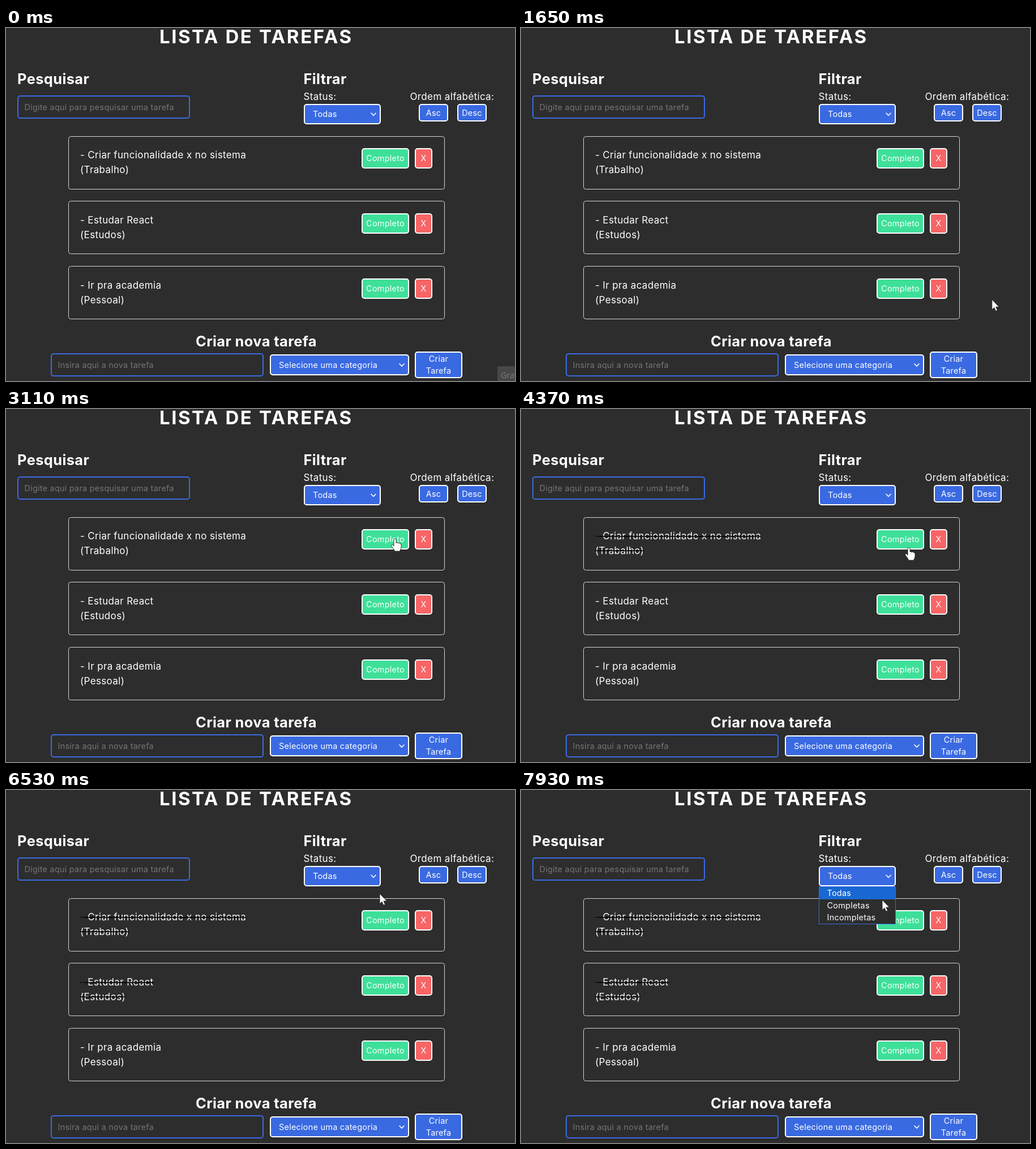
Write an HTML page that moves like this. It is 899 px wide and 623 px high and loops after 8000 ms.

```html
<!DOCTYPE html>
<html lang="pt">
<head>
<meta charset="utf-8">
<title>Lista de tarefas</title>
<style>
  html, body { margin: 0; width: 100%; height: 100%; overflow: hidden; background: #2d2d2d; }
  svg { display: block; width: 899px; height: 623px; }
  text { font: 400 14.4px Inter, "Open Sans", sans-serif; letter-spacing: .27px; fill: #fff; }
  .title { font-size: 33px; font-weight: 700; letter-spacing: 2.6px; }
  .head { font-size: 25.4px; font-weight: 700; letter-spacing: .4px; }
  .body { font-size: 17px; letter-spacing: .36px; }
  .hint { fill: #757575; }
  .mid { text-anchor: middle; }
  .tip { font: 14px "Open Sans", sans-serif; letter-spacing: 0; fill: #7d7d7d; }
</style>
</head>
<body>
<svg viewBox="0 0 899 623" xmlns="http://www.w3.org/2000/svg">
  <g id="page"></g>
  <g id="menu"></g>
  <g id="tip"></g>
  <g id="cursor" fill="#fff" stroke="#151515" stroke-width=".8" stroke-linejoin="round">
    <path id="arrow" d="M0 0V18L4 14.2L6.8 20.3L9.6 19L6.9 13H12.6Z"/>
    <path id="hand" d="M-2 1Q0 -2 2 1V7Q4 6 5 8Q7 6 8 8Q11 8 11 11V15Q11 18 9 20V22H-1V20L-6 13Q-7 11 -5 10Q-3 11 -2 13Z"/>
  </g>
</svg>
<script>
const $ = id => document.getElementById(id);
const BLUE = '#3a6ae2', GREEN = '#3ee099', RED = '#f76566', BG = '#2d2d2d';
const LOOP = 8000, PITCH = 114.6, ROW = 25.4, STEP = 69;
const page = $('page'), menu = $('menu'), tip = $('tip');
const hotspots = [];

function add(parent, tag, attrs, str) {
  const el = document.createElementNS('http://www.w3.org/2000/svg', tag);
  for (const k in attrs) el.setAttribute(k, attrs[k]);
  if (str) el.textContent = str;
  return parent.appendChild(el);
}
const label = (str, x, y, cls = '', parent = page) => add(parent, 'text', { x, y, class: cls }, str);
const fill = (parent, x, y, width, height, color) => add(parent, 'rect', { x, y, width, height, fill: color });

// Rounded rectangle whose border lies inside its outer edges
function frame(x, y, w, h, color, stroke, line) {
  add(page, 'rect', {
    x: x + line / 2, y: y + line / 2, width: w - line, height: h - line,
    rx: 4, fill: color, stroke, 'stroke-width': line
  });
}
function button(x, y, w, h, color, ...lines) {
  frame(x, y, w, h, color, '#fff', 2);
  hotspots.push({ x, y, w, h });
  lines.forEach((str, i) =>
    label(str, x + w / 2, y + h / 2 + 5.2 + (i - (lines.length - 1) / 2) * 20.5, 'mid'));
}
function select(x, y, w, h, str) {
  button(x, y, w, h, BLUE);
  label(str, x + 16, y + h / 2 + 5.2);
  add(page, 'path', {
    d: `M${x + w - 17.5} ${y + h / 2 - 2.2}l4.5 4.5l4.5 -4.5`,
    fill: 'none', stroke: '#fff', 'stroke-width': 1.6
  });
}
function field(x, y, w, h, str) {
  frame(x, y, w, h, 'none', BLUE, 2);
  label(str, x + 12.5, y + h / 2 + 5.2, 'hint');
}

label('LISTA DE TAREFAS', 271, 26.7, 'title');
label('Pesquisar', 20, 98.5, 'head');
field(20, 119, 305, 41, 'Digite aqui para pesquisar uma tarefa');
label('Filtrar', 525.5, 98.5, 'head');
label('Status:', 525.5, 127, 'body');
select(526, 134, 136, 36, 'Todas');
label('Ordem alfabética:', 713.5, 127, 'body');
['Asc', 'Desc'].forEach((str, i) => button(729 + 68 * i, 134, 52, 31, BLUE, str));

const tasks = [
  ['Criar funcionalidade x no sistema', 'Trabalho', 3580],
  ['Estudar React', 'Estudos', 5050],
  ['Ir pra academia', 'Pessoal', Infinity]
].map(([name, group, done], i) => {
  const y = Math.floor(191 + i * PITCH), top = Math.floor(212.8 + i * PITCH);
  frame(110, y, 665, 94, 'none', '#d6d6d6', 1);
  button(628, top, 84, 36, GREEN, 'Completo');
  button(722, top, 31, 36, RED, 'X');
  const lines = [`- ${name}`, `(${group})`].map((str, row) =>
    label(str, 131, top + 18.3 + row * ROW, 'body'));
  const strike = add(page, 'g', {});
  lines.forEach((line, row) =>
    fill(strike, 131, top + 12 + row * ROW, line.getComputedTextLength(), 1.6, '#000'));
  return { strike, done };
});

label('Criar nova tarefa', 442, 561.5, 'head mid');
field(79, 574, 376, 41, 'Insira aqui a nova tarefa');
select(466, 576, 246, 37, 'Selecione uma categoria');
button(722, 571, 84, 47, BLUE, 'Criar', 'Tarefa');

// Open status list
fill(menu, 526, 170, 136, 67, BLUE);
fill(menu, 527, 171, 134, 65, BG);
fill(menu, 527, 171, 134, 22, '#1967d2');
['Todas', 'Completas', 'Incompletas'].forEach((s, i) => label(s, 540.5, 187.2 + i * 21.5, '', menu));

fill(tip, 868, 597, 31, 26, '#484848');
label('Gravar', 874, 618, 'tip', tip);

// Each cursor move follows a Bezier curve
const linear = u => u;
const easeOut = u => 1 - (1 - u) ** 2;
const moves = [
  { from: 1230, to: 2000, ease: linear, path: [[894, 612], [849, 496], [760, 359]] },
  { from: 2200, to: 2970, ease: linear, path: [[768, 350], [860, 310], [870, 240], [693, 233]] },
  { from: 3040, to: 3110, ease: linear, path: [[690, 231], [687, 229]] },
  { from: 4370, to: 5120, ease: easeOut, path: [[685, 245], [695, 320], [677, 345]] },
  { from: 6180, to: 6940, ease: easeOut, path: [[677, 338], [673, 201], [646, 140]] },
  { from: 7660, to: 7930, ease: linear, path: [[651, 151], [638, 194]] }
];

function bezier(pts, u) {
  while (pts.length > 1)
    pts = pts.slice(1).map(([x, y], i) => [pts[i][0] * (1 - u) + x * u, pts[i][1] * (1 - u) + y * u]);
  return pts[0];
}

function position(t) {
  const move = moves.filter(m => t >= m.from).pop();
  if (!move) return null;
  const steps = Math.round((move.to - move.from) / STEP);
  const u = (t - move.from) / (move.to - move.from);
  return bezier(move.path, move.ease(Math.min(1, Math.floor(u * steps + 1e-6) / steps)));
}

const show = (el, on) => el.setAttribute('visibility', on ? 'visible' : 'hidden');

function draw(t) {
  const open = t >= 6870;
  show(tip, t < 70);
  show(menu, open);
  tasks.forEach(k => show(k.strike, t >= k.done));

  const p = position(t);
  const seen = p && (t < 7070 || t >= 7660);
  const over = seen && t < 7660 && hotspots.some(b =>
    p[0] >= b.x && p[0] <= b.x + b.w && p[1] >= b.y && p[1] <= b.y + b.h);
  show($('hand'), seen && over);
  show($('arrow'), seen && !over);
  if (p) $('cursor').setAttribute('transform', `translate(${p[0]} ${p[1]})`);
}

const begin = performance.now();
function tick() {
  draw((performance.now() - begin) % LOOP);
  requestAnimationFrame(tick);
}
tick();
</script>
</body>
</html>
```
